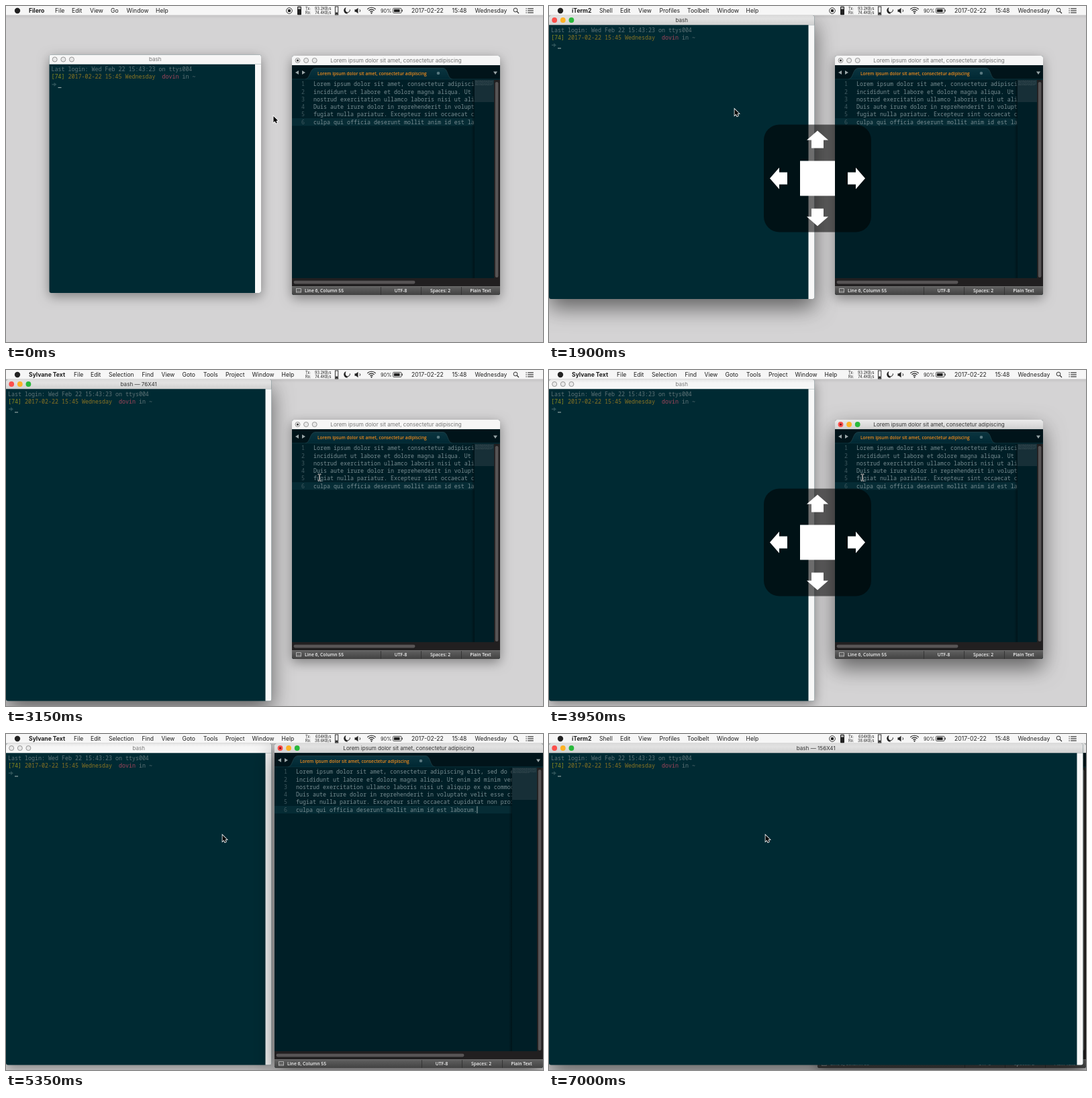
An HTML page with a canvas for the animation above (7050 ms loop, 800 by 500 pixels).

```html
<!DOCTYPE html>
<html lang="en">
<head>
<meta charset="utf-8">
<title>Window tiling</title>
<style>
html, body { margin: 0; width: 100%; height: 100%; overflow: hidden; background: #d3d2d3; }
canvas { display: block; width: 800px; height: 500px; }
</style>
</head>
<body>
<canvas id="stage" width="800" height="500"></canvas>
<script>
const ctx = document.getElementById('stage').getContext('2d');
const LOOP = 7050;
const UI = 'Inter, "Open Sans", sans-serif';
const SMALL = '"Open Sans", "Noto Sans", sans-serif';
const MONO = '"Noto Sans Mono", "DejaVu Sans Mono", monospace';
const TITLE = 'Lorem ipsum dolor sit amet, consectetur adipiscing';
const LINES = [
  TITLE + ' elit, sed do eiusmod tempor',
  'incididunt ut labore et dolore magna aliqua. Ut enim ad minim veniam, quis',
  'nostrud exercitation ullamco laboris nisi ut aliquip ex ea commodo consequat.',
  'Duis aute irure dolor in reprehenderit in voluptate velit esse cillum dolore eu',
  'fugiat nulla pariatur. Excepteur sint occaecat cupidatat non proident, sunt in',
  'culpa qui officia deserunt mollit anim id est laborum.'
];
const MENUS = {
  files: [['Filero', 34], ['File', 73], ['Edit', 98], ['View', 125], ['Go', 156], ['Window', 179.5], ['Help', 223]],
  shell: [['iTerm2', 34], ['Shell', 75], ['Edit', 106], ['View', 133], ['Profiles', 164.5], ['Toolbelt', 206],
    ['Window', 250], ['Help', 293.5]],
  editor: [['Sylvane Text', 34], ['File', 101], ['Edit', 126], ['Selection', 153], ['Find', 202.5], ['View', 231.5],
    ['Goto', 262.5], ['Tools', 294], ['Project', 327], ['Window', 366.5], ['Help', 410.5]]
};

function rect(x, y, w, h, color) {
  ctx.fillStyle = color;
  ctx.fillRect(x, y, w, h);
}

function round(x, y, w, h, r, color) {
  ctx.beginPath();
  ctx.roundRect(x, y, w, h, r);
  ctx.fillStyle = color;
  ctx.fill();
}

function disc(x, y, r, color) {
  ctx.beginPath();
  ctx.arc(x, y, r, 0, Math.PI * 2);
  ctx.fillStyle = color;
  ctx.fill();
}

function ring(x, y, r, color, width) {
  ctx.beginPath();
  ctx.arc(x, y, r, 0, Math.PI * 2);
  ctx.strokeStyle = color;
  ctx.lineWidth = width;
  ctx.stroke();
}

function poly(points, color) {
  ctx.beginPath();
  for (let i = 0; i < points.length; i += 2) ctx.lineTo(points[i], points[i + 1]);
  ctx.closePath();
  ctx.fillStyle = color;
  ctx.fill();
}

function line(x1, y1, x2, y2, color, width) {
  ctx.beginPath();
  ctx.moveTo(x1, y1);
  ctx.lineTo(x2, y2);
  ctx.strokeStyle = color;
  ctx.lineWidth = width;
  ctx.stroke();
}

function text(s, x, y, font, color, align = 'left') {
  ctx.font = font;
  ctx.textAlign = align;
  ctx.fillStyle = color;
  ctx.fillText(s, x, y);
}

function vertical(y, h, top, bottom) {
  const g = ctx.createLinearGradient(0, y, 0, y + h);
  g.addColorStop(0, top);
  g.addColorStop(1, bottom);
  return g;
}

// Shadow, title bar and buttons shared by both windows
function frame(x, y, w, h, active, title, body, edited) {
  ctx.save();
  ctx.shadowColor = active ? 'rgba(0,0,0,.55)' : 'rgba(0,0,0,.4)';
  ctx.shadowBlur = active ? 32 : 17;
  ctx.shadowOffsetY = active ? 13 : 5;
  round(x, y, w, h, 3, body);
  ctx.restore();
  round(x, y, w, 14.3, [3, 3, 0, 0], active ? vertical(y, 14, '#ebebeb', '#d0d0d0') : '#f6f6f6');
  text(title, x + w / 2, y + 9.9, '8.1px ' + UI, active ? '#333' : '#777', 'center');
  ['#fc4f4b', '#fdb225', '#29b93b'].forEach((c, i) => {
    const bx = x + (edited ? 8.5 : 8.2) + i * 12.6, by = y + 7;
    disc(bx, by, 3.9, active ? c : '#e9e9e9');
    if (!active) ring(bx, by, 3.5, '#858585', 0.8);
    if (edited && !i) disc(bx, by, 1.5, active ? '#7a1210' : '#333');
  });
}

function terminal(x, y, w, h, active, title) {
  frame(x, y, w, h, active, title, '#002a33', false);
  round(x + w - 9, y + 14.3, 9, h - 14.3, [0, 0, 3, 0], '#f8f8f8');
  const font = '8.33px ' + MONO;
  const row = n => y + 24.6 + n * 11.3;
  text('Last login: Wed Feb 22 15:43:23 on ttys004', x + 3, row(0), font, '#607478');
  text('[74]', x + 3, row(1), font, '#8a8a20');
  text('2017-02-22 15:45 Wednesday', x + 28, row(1), font, '#8b7423');
  text('dovin', x + 168, row(1), font, '#a2455a');
  text('in ~', x + 198, row(1), font, '#607478');
  const ay = row(2) - 3;
  line(x + 4, ay, x + 9, ay, '#2c5157', 1.6);
  poly([x + 7, ay - 3, x + 11, ay, x + 7, ay + 3], '#2c5157');
  rect(x + 13, y + 48.4, 5, 1.1, '#9aabab');
}

function editor(x, y, w, h, active, statusRight) {
  frame(x, y, w, h, active, TITLE, '#001f27', true);
  const r = x + w, b = y + h, mapW = w > 350 ? 37 : 29, mapX = r - 9 - mapW;

  // tab strip
  rect(x, y + 14.3, w, 21.7, '#01141a');
  ctx.beginPath();
  ctx.moveTo(x + 20, y + 35);
  ctx.bezierCurveTo(x + 28, y + 34, x + 26, y + 18.5, x + 35, y + 18.5);
  ctx.lineTo(x + 225, y + 18.5);
  ctx.bezierCurveTo(x + 233, y + 18.5, x + 231, y + 34, x + 239, y + 35);
  ctx.fillStyle = vertical(y + 18, 17, '#0b3540', '#002833');
  ctx.fill();
  ctx.strokeStyle = '#24464e';
  ctx.lineWidth = 0.7;
  ctx.stroke();
  rect(x, y + 34.5, w, 1, '#0b3741');
  text(TITLE, x + 38, y + 28.5, '600 6.6px ' + SMALL, '#ee8b1c');
  disc(x + 218, y + 26, 2.3, '#587880');
  poly([x + 5, y + 25, x + 10, y + 22, x + 10, y + 28], '#9aa6a8');
  poly([x + 20, y + 25, x + 15, y + 22, x + 15, y + 28], '#9aa6a8');
  poly([r - 10, y + 23.5, r - 4, y + 23.5, r - 7, y + 28], '#9aa6a8');

  // document
  rect(x, y + 93, w - 9, 11.3, '#062c35');
  ctx.save();
  ctx.beginPath();
  ctx.rect(x, y + 36, mapX - x, h - 60);
  ctx.clip();
  LINES.forEach((s, i) => {
    const by = y + 45.3 + i * 11.24;
    text(i + 1, x + 19, by, '8.33px ' + MONO, '#415b61', 'right');
    text(s, x + 32, by, '8.33px ' + MONO, '#788d92');
  });
  if (active) rect(x + 301.5, y + 93.5, 0.9, 10.5, '#a5b3b5');
  ctx.restore();

  // minimap
  const fade = ctx.createLinearGradient(mapX - 5, 0, mapX, 0);
  fade.addColorStop(0, 'rgba(0,10,14,0)');
  fade.addColorStop(1, 'rgba(0,10,14,.55)');
  rect(mapX - 5, y + 36, 5, h - 60, fade);
  rect(mapX, y + 36, mapW, h - 60, '#001e26');
  rect(mapX, y + 36, mapW, mapW > 30 ? 48 : 33, '#172f37');
  for (let i = 0; i < 6; i++) {
    ctx.setLineDash([3 + i % 3, 0.7, 2, 0.6]);
    const len = i < 5 ? mapW : Math.min(mapW, 27);
    line(mapX + 1, y + 37.4 + i * 1.25, mapX + len - 1, y + 37.4 + i * 1.25, '#3b5056', 0.6);
  }
  ctx.setLineDash([]);

  // scroll bars
  rect(r - 9, y + 36, 9, h - 49, '#211f20');
  round(r - 7.2, y + 39, 4.6, h - 65, 2.3, '#575455');
  rect(x, b - 25, w, 12, '#211f20');
  round(x + 2.5, b - 21.2, w * 0.7 - (w > 350 ? 0 : 36), 4.6, 2.3, '#575455');

  // status bar
  round(x, b - 13, w, 13, [0, 0, 3, 3], vertical(b - 13, 13, '#626262', '#424242'));
  rect(x, b - 13, w, 0.7, '#777');
  [178, 118, 58].forEach(d => rect(statusRight - d, b - 12, 0.8, 12, '#2e2e2e'));
  ctx.strokeStyle = '#c8c8c8';
  ctx.lineWidth = 0.8;
  ctx.strokeRect(x + 6.5, b - 9.3, 7, 5.5);
  line(x + 6.5, b - 5.6, x + 13.5, b - 5.6, '#c8c8c8', 0.6);
  const font = '600 6.8px ' + SMALL;
  text('Line 6, Column 55', x + 19, b - 4.2, font, '#f0f0f0');
  text('UTF-8', statusRight - 148, b - 4.2, font, '#f0f0f0', 'center');
  text('Spaces: 2', statusRight - 89, b - 4.2, font, '#f0f0f0', 'center');
  text('Plain Text', statusRight - 29, b - 4.2, font, '#f0f0f0', 'center');
}

function statusIcons(menu, rates) {
  const ink = '#222';
  if (menu !== 'editor') {
    ring(422, 7, 4.3, ink, 0.9);
    round(420, 5, 4, 4, 0.7, ink);
    round(434, 0.8, 6, 12.4, 1, ink);
    rect(435, 2, 4, 2.6, '#bbb');
  }
  ['Tx:', 'Rx:'].forEach((s, i) => {
    text(s, 446, 5.7 + i * 6.3, '5.7px ' + UI, ink);
    text(rates[i], 484.5, 5.7 + i * 6.3, '5.7px ' + UI, ink, 'right');
  });
  ctx.strokeStyle = ink;
  ctx.lineWidth = 0.9;
  ctx.strokeRect(490.4, 1, 4.4, 12);
  rect(491.2, 9.5, 2.8, 3, ink);

  // crescent
  ctx.beginPath();
  ctx.arc(508, 6.5, 4.8, -1.9, 1.3, true);
  ctx.quadraticCurveTo(504, 8, 506.5, 2);
  ctx.fillStyle = ink;
  ctx.fill();
  ctx.beginPath();
  ctx.arc(508.5, 5.8, 3.9, -0.1, 2.5);
  ctx.strokeStyle = ink;
  ctx.lineWidth = 1.1;
  ctx.stroke();

  poly([519.5, 5.2, 521.5, 5.2, 524.5, 2.8, 524.5, 11.2, 521.5, 8.8, 519.5, 8.8], ink);
  ctx.beginPath();
  ctx.arc(525, 7, 2.6, -0.8, 0.8);
  ctx.lineWidth = 0.9;
  ctx.stroke();
  for (let r = 3; r < 10; r += 2.9) {
    ctx.beginPath();
    ctx.arc(544.5, 11, r, -2.35, -0.79);
    ctx.lineWidth = 1.1;
    ctx.stroke();
  }
  disc(544.5, 10.6, 1.1, ink);

  text('90%', 558, 9.6, '7.3px ' + UI, ink);
  ctx.lineWidth = 0.8;
  ctx.beginPath();
  ctx.roundRect(576.6, 3.4, 12.4, 7, 1);
  ctx.stroke();
  rect(578, 4.8, 8.6, 4.2, ink);
  rect(589.7, 5.5, 1.1, 2.8, ink);

  const font = '8.6px ' + UI;
  text('2017-02-22', 604, 10, font, ink);
  text('15:48', 664.5, 10, font, ink);
  text('Wednesday', 698.5, 10, font, ink);
  ring(759, 6, 2.9, ink, 0.9);
  line(761.2, 8.2, 764, 11, ink, 1.1);
  for (let i = 0; i < 3; i++) {
    rect(774.5, 3.4 + i * 3, 1.3, 1.1, ink);
    rect(777.2, 3.4 + i * 3, 8.6, 1.1, ink);
  }
}

function menuBar(menu, rates) {
  rect(0, 14, 800, 5, vertical(14, 5, 'rgba(0,0,0,.07)', 'rgba(0,0,0,0)'));
  rect(0, 0, 800, 14, '#f6f6f6');
  rect(0, 13.5, 800, 0.5, '#bdbdbd');
  disc(17, 7, 4.2, '#222');
  MENUS[menu].forEach(([s, x], i) => text(s, x, 10, (i ? '' : '700 ') + '8.6px ' + UI, '#1c1c1c'));
  statusIcons(menu, rates);
}

function hud(alpha) {
  ctx.save();
  ctx.globalAlpha = alpha;
  round(320, 176.5, 160, 160, 23, 'rgba(0,0,0,.56)');
  ctx.translate(400, 256.5);
  for (let i = 0; i < 4; i++) {
    poly([0, -71, 16, -57, 9, -57, 9, -45, -9, -45, -9, -57, -16, -57], '#fff');
    ctx.rotate(Math.PI / 2);
  }
  rect(-26, -26, 52, 52, '#fff');
  ctx.restore();
}

function pointer(x, y) {
  ctx.beginPath();
  [[0, 0], [0, 9.3], [2.2, 7.3], [3.7, 10.6], [5.3, 9.9], [3.9, 6.7], [6.6, 6.6]]
    .forEach(([dx, dy]) => ctx.lineTo(x + dx, y + dy));
  ctx.closePath();
  ctx.strokeStyle = '#fff';
  ctx.lineWidth = 1.6;
  ctx.stroke();
  ctx.fillStyle = '#000';
  ctx.fill();
}

function iBeam(x, y) {
  for (const [color, width] of [['#eee', 1.8], ['#111', 0.7]]) {
    line(x, y - 4, x, y + 4, color, width);
    line(x - 2.2, y - 5.2, x, y - 4, color, width);
    line(x + 2.2, y - 5.2, x, y - 4, color, width);
    line(x - 2.2, y + 5.2, x, y + 4, color, width);
    line(x + 2.2, y + 5.2, x, y + 4, color, width);
  }
}

const smooth = (t, a, b) => {
  const p = Math.min(1, Math.max(0, (t - a) / (b - a)));
  return p * p * (3 - 2 * p);
};

function mouse(t) {
  let x = 398.5, y = 164;
  for (const [a, b, tx, ty] of [[50, 700, 276.5, 153.5], [2300, 2950, 467, 160], [4600, 5250, 322.5, 150.5]]) {
    const p = smooth(t, a, b);
    x += (tx - x) * p;
    y += (ty - y) * p;
  }
  const overEditor = x > (t < 4000 ? 426 : 400);
  (overEditor ? iBeam : pointer)(x, y);
}

function draw(t) {
  const menu = t < 700 ? 'files' : t < 3100 ? 'shell' : t < 5500 ? 'editor' : 'shell';
  const shellActive = (t >= 800 && t < 3200) || t >= 5600;
  const editorActive = t >= 3200 && t < 5600;
  const rates = t < 4250 ? ['93.2KB/s', '74.4KB/s'] : ['604KB/s', '38.6KB/s'];

  const shellBox = t < 1850 ? [64.5, 72.5, 315.5, 354.5]
    : t < 1950 ? [0, 14, 395.5, 422]
    : t < 6050 ? [0, 14, 395.5, 478.5] : [0, 14, 795.5, 478.5];
  const title = t >= 6050 ? 'bash — 156X41' : t >= 1950 && t < 3200 ? 'bash — 76X41' : 'bash';

  const drawShell = () => terminal(...shellBox, shellActive, title);
  const drawEditor = () => t < 4000
    ? editor(426, 74, 310, 356, editorActive, 736)
    : editor(400, 14, 400, 483, editorActive, 797);

  rect(0, 0, 800, 500, '#d4d3d4');
  const stack = shellActive ? [drawEditor, drawShell] : [drawShell, drawEditor];
  stack.forEach(f => f());
  menuBar(menu, rates);
  for (const start of [1850, 3900, 5900]) {
    if (t >= start && t < start + 650) hud(1 - smooth(t, start + 400, start + 650));
  }
  mouse(t);
}

const began = performance.now();
function tick() {
  const t = (performance.now() - began) % LOOP;
  draw(Math.floor(t / 50) * 50);
  requestAnimationFrame(tick);
}
tick();
</script>
</body>
</html>
```
